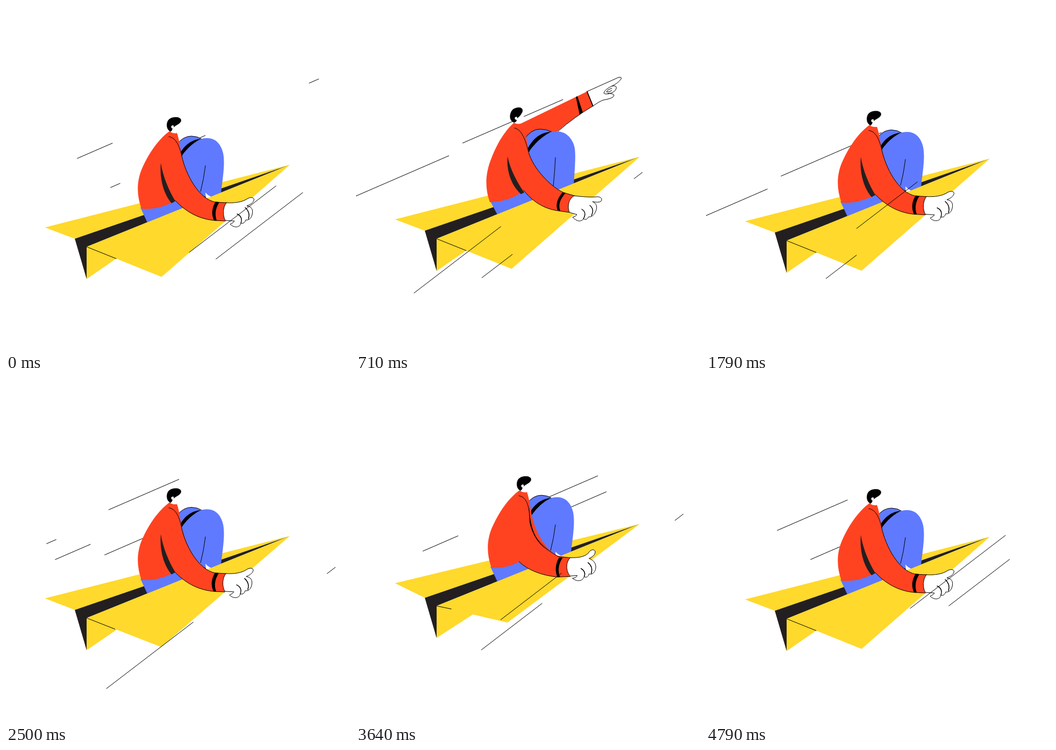
Animation of 640x640 px, one loop 4.87 s. Source, as an HTML page:

```html
<!DOCTYPE html>
<html lang="en">
<head>
<meta charset="utf-8">
<title>Paper plane ride</title>
<style>
html, body { margin: 0; width: 100%; height: 100%; overflow: hidden; background: #fff; }
svg { display: block; width: 100vw; height: 100vh; }
.y { fill: #ffd92b; }
.r { fill: #ff4321; }
.b { fill: #5f7aff; }
.d { fill: #231f20; }
.k { fill: #000; }
.w { fill: #fff; }
.l { fill: none; }
.l, .o { stroke: #000; stroke-width: 1; stroke-linecap: round; stroke-linejoin: round; }
.t { stroke-width: 1.4; }
</style>
</head>
<body>
<svg viewBox="0 0 640 640" xmlns="http://www.w3.org/2000/svg">
  <path id="far" class="l" style="stroke-linecap:butt"/>
  <g id="rider"></g>
  <path id="near" class="l" style="stroke-linecap:butt"/>
</svg>
<script>
const LOOP = 4870, FPS = 14, COUNT = 68;
const $ = id => document.getElementById(id);
const rider = $('rider');

function add(tag, cls, parent) {
  const el = document.createElementNS('http://www.w3.org/2000/svg', tag);
  if (cls) el.setAttribute('class', cls);
  parent.appendChild(el);
  return el;
}

// A shape has a rest pose, a pointing pose and a pulling pose.
const shapes = [];
const numbers = s => s.match(/-?[\d.]+/g).map(Number);
function shape(cls, rest, point = rest, pull = rest) {
  const el = add('path', cls, rider);
  shapes.push({ el, rest, a: numbers(rest), b: numbers(point), c: numbers(pull) });
  return el;
}

// far wing and keel
shape('y', 'M72.5 412L528 295.5L128 433Z', undefined, 'M72.5 405.5L528 295.5L128 433Z');
shape('d', 'M128 433L528 295.5L150 448L150 508Z');

// pointing arm
const arm = add('g', '', rider);
for (const [cls, d] of [
  ['r', 'M300 237L430 174Q438 187 441 201Q407 221 370 252L318 285Z'],
  ['l', 'M430 174L441 201Q407 221 376 248'],
  ['k', 'M409 184L412 183L422 213L416 217Z'],
  ['w o', 'M430 174L488 148Q495 146 493 151Q487 159 476 164Q486 162 484 169Q481 177 468 178Q480 177 480 182Q478 187 460 190Q452 193 441 201Z'],
  ['l', 'M476 164Q463 170 461 177Q464 180 470 178M476 168Q467 171 466 175Q471 176 476 172'],
  ['l t', 'M430 174L441 201']
]) add('path', cls, arm).setAttribute('d', d);

// legs
shape('b', 'M250 375L264 405L335 377L330 350L290 355Z', 'M248 375L264 405L335 377L330 350L290 355Z');
shape('b o', 'M318 257Q330 242 345 242Q356 242 365 248L338 300Z',
  'M312 264Q326 244 342 244Q354 244 364 249L332 305Z');
shape('b', 'M326 281Q342 254 364 247C386 242 399 253 404 274C408 295 403 320 400 349L383 357L350 350Z',
  'M320 291Q340 258 364 249C386 244 403 258 407 280C409 295 407 320 405 348L380 361L345 350Z');
shape('k', 'M326 270Q340 249 363 247Q342 257 326 280Z', 'M320 279Q336 250 363 249Q338 262 321 287Z');
shape('l', 'M371 297Q368 322 362 345', 'M371 297Q370 322 367 350');
shape('w', 'M371 347L375 351L383 356L372 358Z', 'M371 357L373 359L375 361L372 362Z');

// near wing
shape('y', 'M150 448L528 295.5L289.5 504Z', undefined, 'M150 448L528 295.5L281.5 478Z');
shape('y', 'M150 448L205 470L150 508Z', undefined, 'M150 448L219 463L150 507.5Z');
shape('l', 'M150 448L205 470', undefined, 'M150 448L176 453');

// torso with the holding arm
shape('r',
  'M304 233Q311 238 318 236C323 250 324 265 327 279C334 312 358 359 390 365L410 366Q402 383 408 400L388 399C355 396 332 380 315 362C300 372 272 380 252 377C243 352 242 325 255 298C268 270 285 247 304 233Z',
  'M294 232Q301 236 308 233C316 247 318 266 321 287C330 318 362 351 386 362L406 368Q390 384 397 399L376 396C348 392 328 378 312 358C298 371 272 380 249 380C239 352 241 325 252 298C262 272 276 248 294 232Z',
  'M304 233Q311 238 318 236C323 250 324 265 327 279C334 312 352 342 374 354L398 358Q385 375 398 393L374 394C345 391 320 382 303 366C292 372 272 379 252 377C243 352 242 325 255 298C268 270 285 247 304 233Z');
shape('l',
  'M303 243C317 245 323 262 327 279C334 312 358 359 390 365L410 366',
  'M295 242C309 245 316 266 321 287C330 318 362 351 386 362L406 368',
  'M303 243C318 245 323 264 323 290C326 318 346 338 376 356L398 358');
shape('l',
  'M315 362C332 380 355 396 388 399L408 400',
  'M312 358C328 378 348 392 376 396L397 399',
  'M303 366C320 382 345 391 374 394L398 393');
const crease = shape('d', 'M288 292C292 318 304 345 315 363L308 367C290 345 286 315 288 292Z',
  'M282 295C287 320 301 345 313 362L307 365C285 345 280 315 282 295Z');
const fold = shape('k', 'M323 262C327 292 338 325 362 347C340 325 328 292 323 262Z',
  'M316 266C321 300 338 325 362 347C338 325 321 300 316 266Z',
  'M322 262C324 312 338 333 365 350C336 333 321 312 322 262Z');
shape('k', 'M390 364Q379 382 387 399L392 399Q386 382 397 365Z',
  'M384 362Q369 380 375 395L380 396Q374 380 390 363Z',
  'M377 358Q367 376 374 394L379 394Q372 376 384 358Z');

// holding hand
shape('w o',
  'M410 366C425 367 440 365 450 358C456 355 463 356 461 362C459 367 453 370 448 372C458 373 460 380 458 388C456 396 451 399 446 398C444 404 441 405 437 404C435 413 424 413 417 406Q424 403 425 400L408 399C403 390 403 375 410 366Z',
  'M406 368C420 370 438 371 448 370C455 369 459 374 456 378C453 381 445 380 440 379C448 382 450 390 445 399C441 406 437 408 433 407C430 412 427 413 423 411C418 418 410 415 403 408Q409 407 411 403L397 399C393 388 395 374 406 368Z',
  'M398 358C412 358 423 357 431 350C435 343 441 341 444 345C446 351 439 357 433 359C444 364 447 371 445 380C443 386 438 390 433 388C431 395 427 395 424 393C421 402 410 403 402 396Q409 396 411 391L398 392C390 383 389 367 398 358Z');
shape('l t',
  'M430 387Q441 392 437 404M445 375Q455 384 451 396',
  'M420 393Q430 399 423 411M435 386Q444 393 438 405',
  'M418 378Q428 384 424 393M431 367Q441 375 437 387');

// head
shape('w', 'M308 222L325 214L324 229L318 236Q311 238 304 233Z', 'M296 221L310 211L313 223L308 233Q301 236 294 232Z');
shape('k',
  'M306 234C299 230 298 222 300 216C303 207 313 206 320 207C327 209 327 214 324 217C321 221 315 222 312 226Q313 222 310 222Q306 223 308 227L310 228Q309 232 306 234Z',
  'M294 232C286 229 285 220 288 213C291 205 300 203 306 204C311 206 311 211 308 215C306 219 303 221 300 224Q300 221 298 221Q294 222 296 226L299 227Q299 231 294 232Z');

// Smooth curve through [step, value] keys without overshoot.
function curve(keys, k) {
  const last = keys.length - 1;
  if (k <= keys[0][0]) return keys[0][1];
  if (k >= keys[last][0]) return keys[last][1];
  const slope = i => (keys[i + 1][1] - keys[i][1]) / (keys[i + 1][0] - keys[i][0]);
  const tangent = i => {
    if (i === 0 || i === last) return 0;
    const p = slope(i - 1), q = slope(i);
    return p * q <= 0 ? 0 : 2 * p * q / (p + q);
  };
  let i = 0;
  while (keys[i + 1][0] < k) i++;
  const [x, y] = keys[i], [x2, y2] = keys[i + 1], h = x2 - x, u = (k - x) / h;
  const e = u * u * (3 - 2 * u);
  return y + (y2 - y) * e + h * u * (1 - u) * (tangent(i) * (1 - u) - tangent(i + 1) * u);
}
const LIFT = [[0, 0], [10, 15], [16, 25], [25, 11.5], [33, 0], [35, 1.5], [45, 20.5], [49, 25.5], [57, 12], [66, 0]];
const POINT = [[2, 0], [9, 1], [12, 1], [17, 0]];
const PULL = [[33, 0], [35, .08], [45, 1], [48, 1.05], [57, .55], [66, 0]];

// Speed lines: start x, height where the line meets x = 0, first step.
const FAR = [
  [457, 341, 60], [519, 422, 59], [582, 388, 67], [371, 401.6, 67], [400, 341, 6], [296, 353.5, 4],
  [308, 390, 18], [449.5, 377, 19], [322, 328, 32], [400, 341, 26], [416, 377.5, 27], [508, 408.7, 28],
  [324, 329, 36], [321, 413.5, 36], [496, 389.5, 37], [449, 376, 43], [323, 328.4, 53], [450, 377, 48],
  [430, 409, 51], [466, 413.6, 49], [496, 388, 14]
];
const NEAR = [
  [609, 719.5, 62], [609, 719.5, 50], [565, 770, 64], [565.5, 769, 52], [376, 616.7, 4], [515, 685, 2],
  [533, 717.6, 9], [561, 628.5, 18], [504, 678, 17], [455, 721, 29], [613, 821.5, 34], [613, 822, 40],
  [550, 656, 44], [514, 684.5, 44], [455, 625, 51], [613, 821.5, 0], [455, 721, 0], [609, 719.5, 10],
  [455, 721, 12], [613, 821.5, 15], [609, 719.5, 25], [376, 616.7, 25], [455, 721, 35],
  [455, 721, 57], [613, 821.5, 57]
];
const REACH = [0, 20, 72, 143, 220, 289, 338, 354], SPAN = 354, LIFE = 10;
const reach = s => REACH[Math.min(s, 7)];

function streaks(list, slope, k) {
  const dx = 1 / Math.hypot(1, slope);
  let d = '';
  for (const [x, c, born] of list) {
    const s = (k - born + COUNT) % COUNT;
    if (s < 1 || s >= LIFE) continue;
    const x1 = x - dx * reach(s), x2 = x - dx * (SPAN - reach(LIFE - s));
    d += `M${x1} ${c - slope * x1}L${x2} ${c - slope * x2}`;
  }
  return d;
}

function draw(k) {
  const p = curve(POINT, k), q = curve(PULL, k);
  rider.setAttribute('transform', `translate(0 ${-curve(LIFT, k)})`);
  for (const { el, rest, a, b, c } of shapes) {
    let i = 0;
    el.setAttribute('d', rest.replace(/-?[\d.]+/g, () => {
      const n = a[i] + p * (b[i] - a[i]) + q * (c[i] - a[i]);
      i++;
      return n.toFixed(2);
    }));
  }
  arm.setAttribute('visibility', p > .02 ? 'visible' : 'hidden');
  arm.setAttribute('transform', `rotate(${95 * (1 - p)} 310 245)`);
  crease.setAttribute('opacity', q > .3 ? 0 : 1);
  fold.setAttribute('opacity', q > .3 ? 1 : 0);
  $('far').setAttribute('d', streaks(FAR, .4335, k));
  $('near').setAttribute('d', streaks(NEAR, .766, k));
}

const begin = performance.now();
let shown = -1;
function tick() {
  const t = (performance.now() - begin) % LOOP;
  const k = Math.min(COUNT - 1, Math.floor((t + 6) * FPS / 1000));
  if (k !== shown) draw(shown = k);
  requestAnimationFrame(tick);
}
tick();
</script>
</body>
</html>
```
